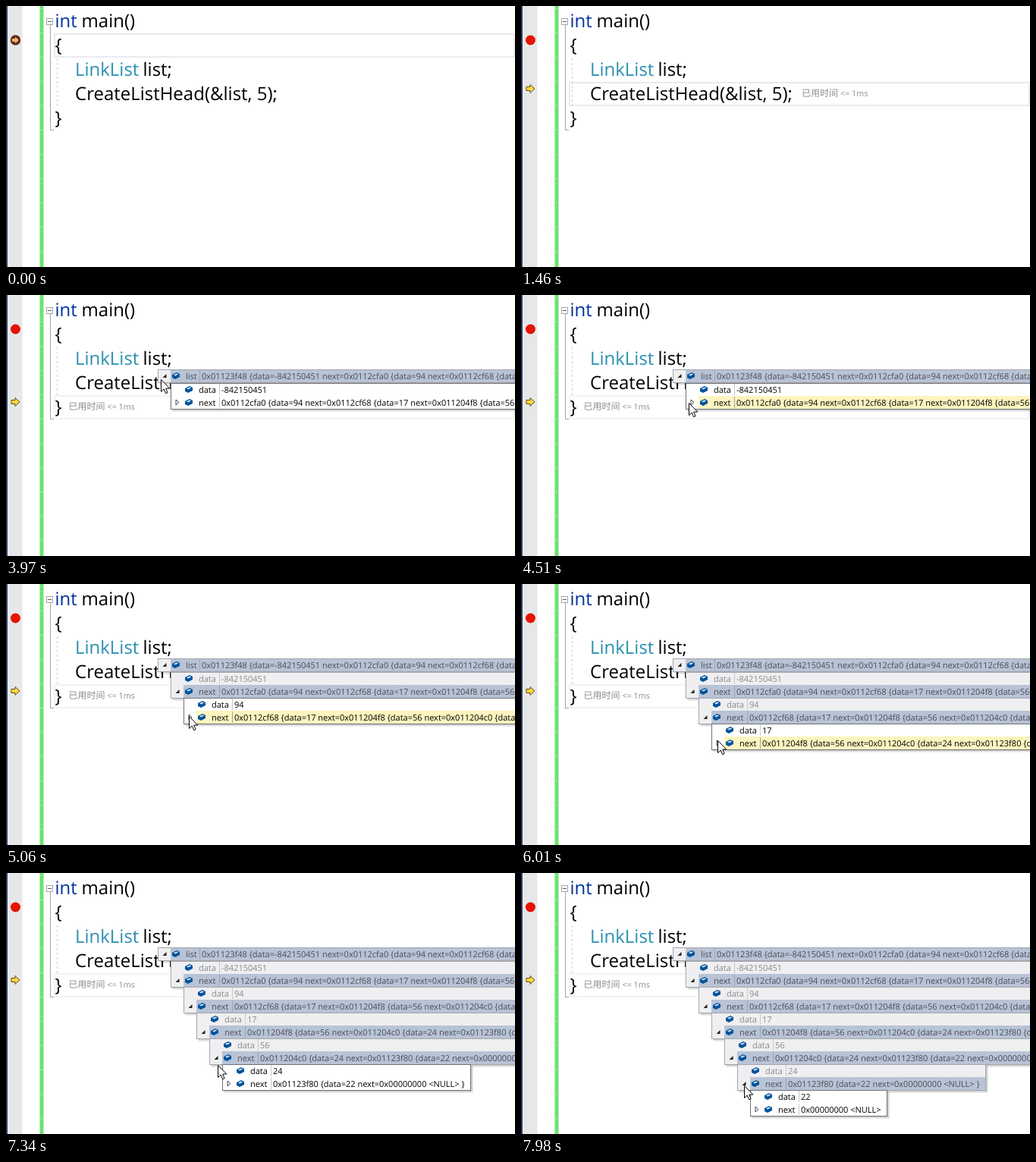
An HTML page with a canvas that plays this animation: 671x344 px, repeating every 8 s.

```html
<!DOCTYPE html>
<html lang="en">
<head>
<meta charset="utf-8">
<title>Linked list in the debugger</title>
<style>
html, body { margin: 0; width: 100%; height: 100%; overflow: hidden; background: #fff; }
canvas { display: block; }
</style>
</head>
<body>
<canvas id="stage" width="671" height="344"></canvas>
<script>
const W = 671, H = 344, LOOP = 8000;
const ctx = document.getElementById('stage').getContext('2d');
const FONT = '"Open Sans", "Noto Sans", sans-serif';
const CJK = '"Noto Sans CJK SC", "Noto Sans CJK", sans-serif';

// Linked list shown in the data tips
const nodes = [
  ['0x01123f48', '-842150451'], ['0x0112cfa0', '94'], ['0x0112cf68', '17'],
  ['0x011204f8', '56'], ['0x011204c0', '24'], ['0x01123f80', '22']
];
const value = i => i < nodes.length
  ? `${nodes[i][0]} {data=${nodes[i][1]} next=${value(i + 1)} }`
  : '0x00000000 <NULL>';

// Time at which each tip level opens
const opens = [3180, 3970, 4680, 5290, 6180, 6960, 7750];

// Pointer moves: start, end, steps, x, y
const moves = [
  [2390, 2870, 7, 201, 93], [3500, 3970, 7, 204, 111], [4140, 4280, 3, 216, 138],
  [4430, 4510, 2, 221, 142], [4830, 5060, 4, 241, 174], [5530, 6010, 7, 259, 206],
  [6320, 6790, 7, 274, 244], [7190, 7580, 6, 293, 279], [7980, 7980, 1, 294, 280]
];

function pointer(t) {
  let x = 349, y = 144;
  for (const [t0, t1, n, tx, ty] of moves) {
    if (t < t0) break;
    const k = Math.min(n, 1 + Math.floor((t - t0) / (t1 - t0 || 1) * (n - 1) + 1e-6)) / n;
    const e = k * k * (3 - 2 * k);
    x += (tx - x) * e;
    y += (ty - y) * e;
  }
  return { x: Math.round(x), y: Math.round(y) };
}

function rect(x, y, w, h, color) {
  ctx.fillStyle = color;
  ctx.fillRect(x, y, w, h);
}

function text(s, x, y, size, color, family = FONT) {
  ctx.font = `${size}px ${family}`;
  ctx.fillStyle = color;
  ctx.fillText(s, x, y);
}

function poly(x, y, pts, fill, stroke) {
  ctx.beginPath();
  for (let i = 0; i < pts.length; i += 2) ctx.lineTo(x + pts[i], y + pts[i + 1]);
  ctx.closePath();
  if (fill) { ctx.fillStyle = fill; ctx.fill(); }
  if (stroke) { ctx.strokeStyle = stroke; ctx.lineWidth = 1; ctx.stroke(); }
}

function disc(x, y, r, color) {
  ctx.fillStyle = color;
  ctx.beginPath();
  ctx.arc(x, y, r, 0, Math.PI * 2);
  ctx.fill();
}

function frame(x, y, w, h, color, width = 1) {
  ctx.strokeStyle = color;
  ctx.lineWidth = width;
  ctx.strokeRect(x + width / 2, y + width / 2, w - width, h - width);
}

const lineTop = n => 4 + 32 * n;
const ARROW = [-5.5, -2.5, -0.5, -2.5, -0.5, -5.5, 5.5, 0, -0.5, 5.5, -0.5, 2.5, -5.5, 2.5];

function drawMargin(line) {
  rect(0, 0, 2, H, '#2b3a63');
  rect(2, 0, 19.5, H, '#e6e7e8');
  rect(44.5, 0, 5, H, '#6ce26c');
  for (let y = 3; y < H; y += 32) rect(45, y, 3, 1, '#a5eca5');

  if (line === 1) {
    disc(12.5, 45, 6.7, '#5c2a1e');
    poly(12.5, 45, ARROW.map(v => v * 0.8), '#f7b765');
  } else {
    disc(12.5, 45, 6.5, '#e51400');
    poly(12.5, lineTop(line) + 9, ARROW, '#ffd83b', '#5c4d20');
  }
}

function drawOutline() {
  frame(53, 16, 9, 9, '#a5a5a5');
  rect(55, 20, 5, 1, '#555');
  rect(58, 25, 1, 138, '#a5a5a5');
  rect(58, 163, 5, 1, '#a5a5a5');
  for (let y = 69; y < 132; y += 6) rect(67, y, 1, 3, '#d0d0d0');
}

function drawElapsed(x, y) {
  text('已用时间', x, y, 12, '#8c8c8c', CJK);
  text('<= 1ms', x + 51, y, 10.75, '#8c8c8c');
}

function drawCode(t, line, p) {
  frame(63, lineTop(line), W - 63, 32, t < opens[1] ? '#eaeaf2' : '#f3f3f6', 2);
  if (t >= 2010 && t < opens[1]) {
    rect(64, 37, 8, 30, '#dbe0cc');
    rect(64, 133, 8, 30, '#dbe0cc');
  }
  drawOutline();
  text('int', 64.5, 28, 24, '#0032a0');
  text('main()', 99.5, 28, 24, '#000');
  text('{', 64.5, 60, 24, '#000');
  text('LinkList', 91, 92, 24, '#2b91af');
  text('list;', 180.5, 92, 24, '#000');
  text('CreateListHead(&list, 5);', 91, 124, 24, '#000');
  text('}', 64.5, 155.5, 24, '#000');
  if (line === 3) drawElapsed(370, 119);
  if (line === 4) drawElapsed(82.5, 151);

  // run-to-here mark on the hovered line
  const over = Math.floor((p.y - 4) / 32);
  if (t >= 2390 && t < 3500 && over < 4) {
    const y = lineTop(over) + 16;
    poly(71, y, [0, -7, 7, 0, 0, 7], '#cfe3ca');
    rect(79, y - 7, 1.5, 14, '#cfe3ca');
  }
}

function drawCube(x, y) {
  poly(x, y, [-5, -1.5, 1, -4.5, 5, -2.5, 5, 1.5, -1, 4.5, -5, 2.5], '#00539c');
  poly(x, y, [-3, -1.2, 1, -3.1, 3.2, -2, -0.9, 0], '#d6e6f5');
}

function drawRow(x, y, name, val, o) {
  const mid = y + 8.5;
  if (o.back) rect(x + 17, y, o.right - x - 17, 17, o.back);
  if (o.mark === 'open') poly(x + 9, mid, [2.5, -2.5, 2.5, 2.5, -2.5, 2.5], '#222');
  if (o.mark === 'shut') poly(x + 9, mid, [-2, -3.5, 2, 0, -2, 3.5], '#fff', '#444');
  drawCube(x + 24, mid);
  text(name, x + 37, mid + 4, 11, o.color);
  const sep = name === 'list' ? 55 : 64;
  rect(x + sep, y + 1, 1, 15, o.back ? '#9aa3b3' : '#c8c8cc');
  text(val, x + sep + 3, mid + 4, 11, o.color);
}

function drawTip(k, active, p) {
  const x = 200 + 17 * k;
  const y = k ? 82 + 34 * k : 98;
  const h = k ? 35 : 18;
  const rows = k
    ? [['data', nodes[k - 1][1]], ['next', value(k)]]
    : [['list', value(0)]];
  const last = rows.length - 1;

  const inside = p.x >= x - 2 && p.y >= y && p.y < y + h;
  const hover = active && inside ? Math.min(last, Math.floor((p.y - y) / 17)) : -1;

  ctx.font = `11px ${FONT}`;
  let right = Math.ceil(x + (k ? 67 : 58) + ctx.measureText(rows[last][1]).width + 8);
  if (hover >= 0) right += 17;
  right = Math.min(right, W + 20);

  rect(x + 3, y + 3, right - x, h, 'rgba(0,0,0,0.07)');
  rect(x + 2, y + 2, right - x, h - 0.5, 'rgba(0,0,0,0.13)');
  rect(x, y, right - x, h, active ? '#fff' : '#efeff1');

  rows.forEach(([name, val], i) => {
    const leaf = name === 'data';
    const chosen = !active && i === last;
    drawRow(x, y + 17 * i, name, val, {
      right,
      mark: leaf ? '' : chosen ? 'open' : 'shut',
      back: chosen ? '#b8c3d5' : hover === i ? '#fdf4bf' : '',
      color: active ? '#000' : chosen ? '#4a4e56' : '#8a8a8a'
    });
  });
  frame(x, y, right - x, h, active ? '#707078' : '#a4a6ae');
}

function drawBeam(x, y) {
  const c = '#222';
  rect(x, y - 7, 1, 15, c);
  for (const dy of [-8, 7]) {
    rect(x - 3, y + dy, 3, 1, c);
    rect(x + 1, y + dy, 3, 1, c);
  }
}

function drawPointer(x, y) {
  poly(x + 0.5, y + 0.5,
    [0, 0, 0, 16, 3.7, 12.6, 6.2, 18.2, 8.6, 17.2, 6.2, 11.6, 11.3, 11.6], '#fff', '#000');
}

function draw(t) {
  const p = pointer(t);
  const line = t < 1460 ? 1 : t < 1860 ? 3 : 4;
  rect(0, 0, W, H, '#fff');
  drawMargin(line);
  drawCode(t, line, p);

  const count = opens.filter(at => t >= at).length;
  for (let k = 0; k < count; k++) drawTip(k, k === count - 1, p);

  if (t >= 70 && t < 130) drawBeam(612, 285);
  if (t >= 2390) {
    if (t >= 3500 && p.y >= 98) drawPointer(p.x, p.y);
    else drawBeam(p.x, p.y);
  }
}

ctx.textRendering = 'geometricPrecision';
const start = performance.now();
function tick(now) {
  draw(Math.max(0, now - start) % LOOP);
  requestAnimationFrame(tick);
}
tick(start);
</script>
</body>
</html>
```
